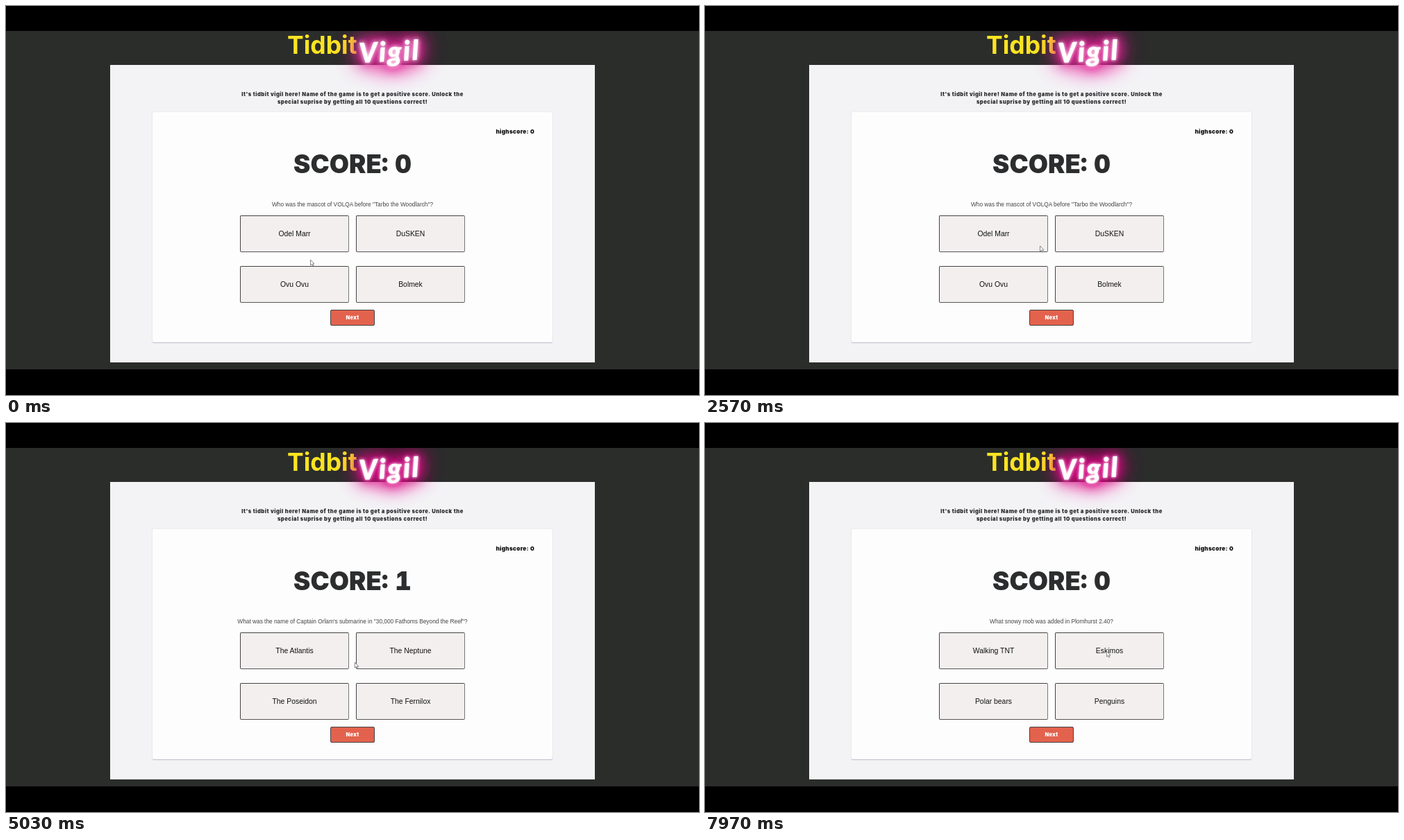
An HTML page for the animation above (8 s loop, 998 by 561 pixels).

```html
<!DOCTYPE html>
<html lang="en">
<head>
<meta charset="utf-8">
<title>Quiz</title>
<style>
  html, body { margin: 0; width: 100%; height: 100%; overflow: hidden; background: #000; }
  .page { position: absolute; left: 0; top: 36px; width: 998px; height: 488px; overflow: hidden; background: #2b2d2b; }
  .stage { position: absolute; left: 0; top: -36px; width: 998px; height: 561px; }
  .stage > * { position: absolute; box-sizing: border-box; white-space: nowrap; }
  .panel { left: 150px; top: 85px; width: 698px; height: 429px; background: #f3f3f5; }
  .card { left: 211px; top: 153px; width: 576px; height: 332px; background: #fdfdfd; border-radius: 2px;
    box-shadow: 0 1px 1px #bcbccb, 0 0 2px #dcdce8; }
  .line { left: 0; width: 998px; text-align: center; line-height: 20px; }
  .black { font-family: Inter, Roboto, sans-serif; font-weight: 900; color: #2c2d2e; }
  .plain, .answer { font-family: "Liberation Sans", Arial, sans-serif; }
  .intro { font-size: 7.6px; letter-spacing: .48px; }
  .high { top: 171px; width: 761px; text-align: right; font-size: 8.2px; letter-spacing: .3px; color: #111; }
  .score { top: 217.5px; font-size: 36.5px; font-variant-numeric: tabular-nums; }
  .question { top: 275.5px; font-size: 8.32px; color: #444; }
  .answer, .next { display: flex; align-items: center; justify-content: center; border-radius: 2px; }
  .answer { width: 157px; height: 53px; font-size: 10.4px; color: #111; background: #f3efef;
    border: 1px solid #444; border-right-color: #777; border-bottom-color: #555; }
  .right, .wrong { color: rgba(16, 16, 16, .35); border-color: #333; }
  .right { background: #aee1ba; }
  .wrong { background: #e59fb0; }
  .next { left: 467px; top: 438px; width: 64px; height: 23px; border: 1px solid #444; background: #e3624d;
    color: #fff; font-size: 7.5px; letter-spacing: .3px; }
  .title { left: 405px; top: 37px; font: 700 35.5px/40px Inter, Roboto, sans-serif; color: #fbe422; }
  .neon { left: 508px; top: 44.5px; font: italic 900 40px/40px Lato, "Open Sans", sans-serif; letter-spacing: 2px; color: #fff;
    transform: rotate(-3deg); }
  .cursor { left: 0; top: 0; width: 8px; height: 11px; overflow: visible; }
</style>
</head>
<body>
<div class="page"><div class="stage">
  <div class="panel"></div>
  <div class="card"></div>
  <div class="title">Tidbit</div>
  <div class="neon">Vigil</div>
  <div class="line black intro" style="top:118px">It's tidbit vigil here! Name of the game is to get a positive score. Unlock the</div>
  <div class="line black intro" style="top:129px">special suprise by getting all 10 questions correct!</div>
  <div class="line black high">highscore: 0</div>
  <div class="line black score"></div>
  <div class="line plain question"></div>
  <div class="answer" style="left:337px;top:302px"></div>
  <div class="answer" style="left:504px;top:302px"></div>
  <div class="answer" style="left:337px;top:375px"></div>
  <div class="answer" style="left:504px;top:375px"></div>
  <div class="black next">Next</div>
  <svg class="cursor"><path d="M.5 0V8L2.3 6.4 3.6 9.2 4.8 8.6 3.6 6H6Z" fill="#fff" stroke="#555" stroke-width=".7"/></svg>
</div></div>
<script>
const LOOP = 8000, GLOW_PERIOD = 3000;

const rounds = [
  { start: 0, reveal: 2800, score: [0, 1], correct: 0,
    question: 'Who was the mascot of VOLQA before "Tarbo the Woodlarch"?',
    answers: ['Odel Marr', 'DuSKEN', 'Ovu Ovu', 'Bolmek'] },
  { start: 3650, reveal: 6100, score: [1, 0], correct: 3,
    question: 'What was the name of Captain Orlam\'s submarine in "30,000 Fathoms Beyond the Reef"?',
    answers: ['The Atlantis', 'The Neptune', 'The Poseidon', 'The Fernilox'] },
  { start: 6930, reveal: Infinity, score: [0, 0], correct: 2,
    question: 'What snowy mob was added in Plomhurst 2.40?',
    answers: ['Walking TNT', 'Eskimos', 'Polar bears', 'Penguins'] }
];

// time, x, y of the pointer tip
const path = [
  [0, 438, 366], [1670, 504, 376], [2570, 482, 346], [2850, 470, 338], [3450, 500, 446],
  [3700, 500, 446], [4270, 442, 340], [5770, 559, 350], [6100, 566, 341], [6500, 515, 464],
  [6700, 513, 467], [6850, 506, 452], [6980, 506, 452], [7970, 578, 329], [8000, 578, 329]
];

const find = selector => document.querySelector(selector);
const score = find('.score'), question = find('.question'), neon = find('.neon'), cursor = find('.cursor');
const buttons = document.querySelectorAll('.answer');
const mix = (a, b, k) => a + (b - a) * k;

function setText(node, text) {
  if (node.textContent !== text) node.textContent = text;
}

function pointerAt(t) {
  const i = path.findIndex(p => p[0] > t);
  const [t0, x0, y0] = path[i - 1], [t1, x1, y1] = path[i];
  const u = (t - t0) / (t1 - t0), k = u * u * (3 - 2 * u);
  return [mix(x0, x1, k), mix(y0, y1, k)];
}

// a thin white halo over stacked pink ones that widen and lighten with k
function glow(k) {
  const pink = `rgb(${mix(215, 228, k)},${mix(0, 50, k)},${mix(125, 158, k)})`;
  const halos = Array.from({ length: 7 }, (_, i) => `0 0 ${5.2 * (i + 1 + k)}px ${pink}`);
  return [`0 0 ${mix(3, 6, k)}px #fff`, ...halos].join();
}

function draw(t) {
  const round = rounds.findLast(r => r.start <= t);
  const revealed = t >= round.reveal;
  setText(score, 'SCORE: ' + round.score[+revealed]);
  setText(question, round.question);
  buttons.forEach((button, i) => {
    setText(button, round.answers[i]);
    button.className = 'answer' + (revealed ? (i === round.correct ? ' right' : ' wrong') : '');
  });
  neon.style.textShadow = glow((1 + Math.cos((t + 150) / GLOW_PERIOD * 2 * Math.PI)) / 2);
  const [x, y] = pointerAt(t);
  cursor.style.transform = `translate(${x}px,${y}px)`;
}

const begin = performance.now();
function tick() {
  draw((performance.now() - begin) % LOOP);
  requestAnimationFrame(tick);
}
tick();
</script>
</body>
</html>
```
